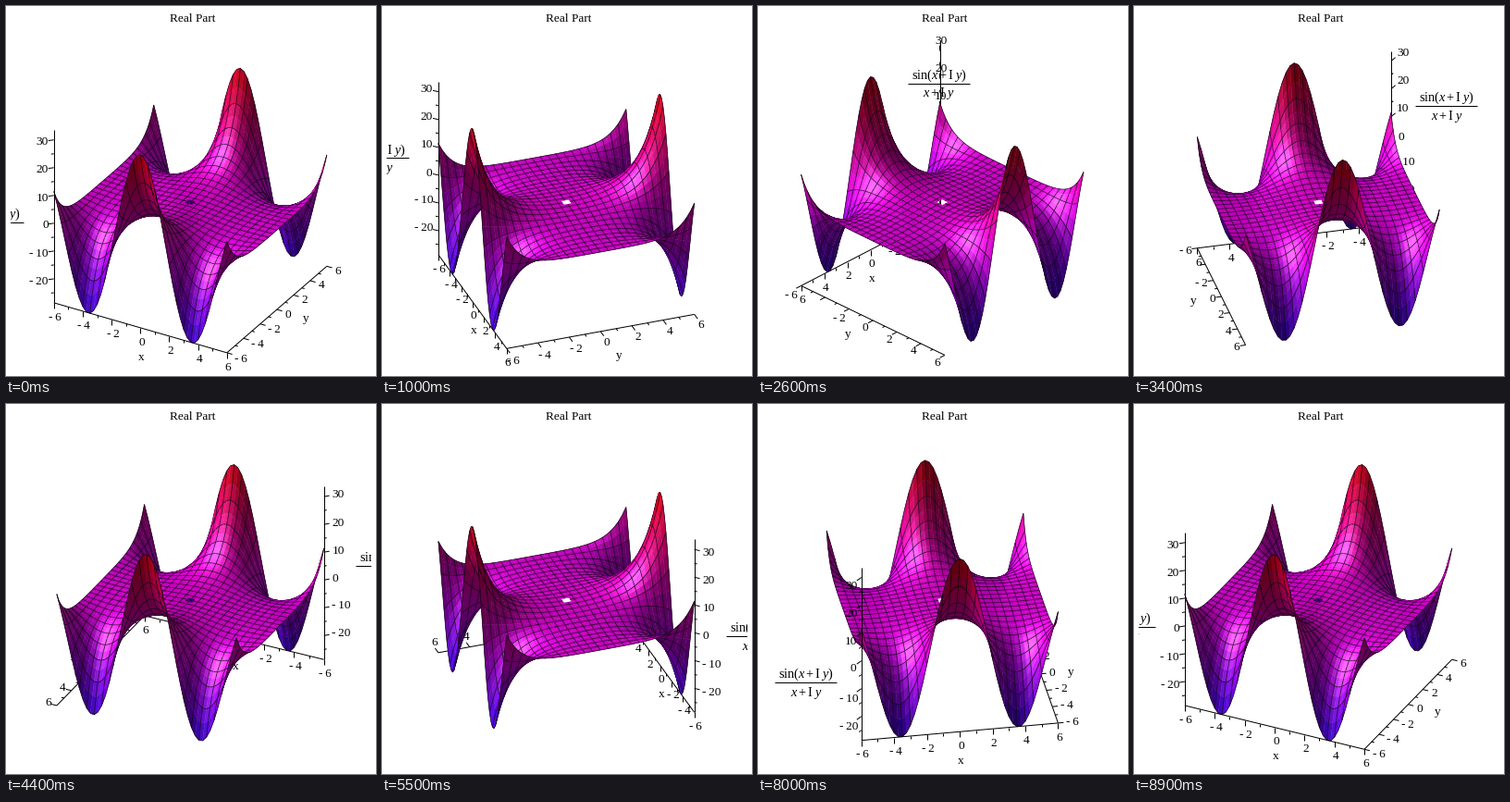
Recreate the animation shown at these times as a matplotlib script. Size 400x400 px, loop 9000 ms.

```python
import numpy as np
import matplotlib.pyplot as plt
from matplotlib.animation import FuncAnimation
from matplotlib.collections import PolyCollection
from matplotlib.colors import hsv_to_rgb

FRAMES, INTERVAL = 90, 100
PX = 0.72                      # one pixel in points at 100 dpi
CX, BASE, HEIGHT = 199.3, 301.1, 187
UNIT, TILT = 18, 0.5           # pixels per x/y unit, vertical foreshortening
FONT = 13.33

plt.rcParams.update({
    "font.family": ["Liberation Serif", "DejaVu Serif"],
    "mathtext.fontset": "custom",
    "mathtext.rm": "Liberation Serif",
    "mathtext.it": "Liberation Serif:italic",
})

# Surface Re(sin(z)/z); undefined at the origin, which leaves a small hole
N = 49
g = np.linspace(-6, 6, N)
X, Y = np.meshgrid(g, g, indexing="ij")
with np.errstate(all="ignore"):
    W = X + 1j * Y
    Z = (np.sin(W) / W).real
ZMIN, ZMAX = np.nanmin(Z), np.nanmax(Z)
ZPX = HEIGHT / (ZMAX - ZMIN)


def corners(a):
    return np.stack([a[:-1, :-1], a[1:, :-1], a[1:, 1:], a[:-1, 1:]], -1)


cx, cy, cz = (corners(a).reshape(-1, 4) for a in (X, Y, Z))
keep = ~np.isnan(cz).any(1)
cx, cy, cz = cx[keep], cy[keep], cz[keep]

# Cell normals in equal-scale space
slope = ZPX / np.sqrt(1 - TILT ** 2) / UNIT / (g[1] - g[0]) / 2
p = (cz[:, 1] + cz[:, 2] - cz[:, 0] - cz[:, 3]) * slope
q = (cz[:, 2] + cz[:, 3] - cz[:, 0] - cz[:, 1]) * slope
normal = np.stack([-p, -q, np.ones_like(p)], 1)
normal /= np.linalg.norm(normal, axis=1)[:, None]

level = (cz.mean(1) - ZMIN) / (ZMAX - ZMIN)
hue = 0.71 + 0.28 * level
base_rgb = hsv_to_rgb(np.stack([hue, np.ones_like(hue), np.ones_like(hue)], 1))

VIEW = np.array([0, np.sqrt(1 - TILT ** 2), TILT])
LIGHT = np.array([-0.76, 0.08, 0.645])
HALF = (VIEW + LIGHT) / np.linalg.norm(VIEW + LIGHT)


def grid_segments():
    """Mesh lines on every second grid row, as flat quads a-b-b-a."""
    out = []
    for a in (X, Y, Z):
        along_x = np.stack([a[:-1, ::2], a[1:, ::2]], -1).reshape(-1, 2)
        along_y = np.stack([a[::2, :-1], a[::2, 1:]], -1).reshape(-1, 2)
        out.append(np.concatenate([along_x, along_y]))
    is_x = np.arange(len(out[0])) < len(along_x)
    ok = ~np.isnan(out[2]).any(1)
    return [a[ok][:, [0, 1, 1, 0]] for a in out] + [is_x[ok]]


lx, ly, lz, l_is_x = grid_segments()
allx, ally, allz = (np.concatenate(v) for v in ((cx, lx), (cy, ly), (cz, lz)))
widths = np.r_[np.full(len(cx), 0.4), np.full(len(lx), 0.75)] * PX
line_rgba = np.tile([0.03, 0, 0.05, 0.85], (len(lx), 1))

fig = plt.figure(figsize=(4, 4), dpi=100, facecolor="white")
ax = fig.add_axes([5 / 400, 5 / 400, 390 / 400, 390 / 400])
ax.set_xlim(5, 395)
ax.set_ylim(395, 5)
ax.axis("off")
ax.text(201.3, 14, "Real Part", size=FONT * PX, ha="center", va="center")
live = []


def project(t, x, y, z=ZMIN):
    c, s = np.cos(t), np.sin(t)
    sx = CX + UNIT * (x * c + y * s)
    sy = BASE + UNIT * TILT * (x * s - y * c) - ZPX * (z - ZMIN)
    return np.array([sx, sy])


def unit(x, y):
    return np.array([x, y]) / np.hypot(x, y)


def line(a, b, order):
    live.extend(ax.plot([a[0], b[0]], [a[1], b[1]], color="black", lw=PX,
                        zorder=order, solid_capstyle="butt"))


def text(pos, s, order, size=FONT):
    live.append(ax.text(pos[0] + 1.4, pos[1] + 0.8, s, size=size * PX,
                        ha="center", va="center", zorder=order, clip_on=True))


def label_pos(pos, d, value):
    w = 6.7 * len(str(abs(value))) + (7 if value < 0 else 0)
    return pos + d * (7 + w / 2 * abs(d[0]) + 4.5 * abs(d[1]))


def ticks(point, values, step, d, order):
    for v in values:
        a = point(v)
        line(a, a + d * (6 if v % step == 0 else 3), order)


def number(pos, v, order):
    text(pos, f"-\u2009{-v}" if v < 0 else str(v), order)


def layer(front):
    return 5 if front else 1


def draw_surface(t):
    c, s = np.cos(t), np.sin(t)
    n = np.stack([normal[:, 0] * c + normal[:, 1] * s,
                  normal[:, 0] * s - normal[:, 1] * c, normal[:, 2]], 1)
    n *= np.where(n @ VIEW < 0, -1, 1)[:, None]
    diffuse = 0.38 + 0.60 * np.clip(n @ LIGHT, 0, 1)
    shine = 0.43 * np.clip(n @ HALF, 0, 1) ** 14
    rgb = np.clip(base_rgb * diffuse[:, None] + shine[:, None], 0, 1)
    rgba = np.concatenate([np.c_[rgb, np.ones(len(rgb))], line_rgba])

    # Back to front; mesh lines come just after both neighbouring cells
    depth = (allx * s - ally * c).mean(1)
    half = (g[1] - g[0]) / 2
    depth[len(cx):] += half * np.where(l_is_x, abs(c), abs(s)) + 1e-4
    order = np.argsort(depth, kind="stable")
    verts = np.moveaxis(project(t, allx, ally, allz), 0, -1)
    mesh = PolyCollection(verts[order], facecolors=rgba[order],
                          edgecolors=rgba[order], linewidths=widths[order],
                          zorder=3)
    live.append(mesh)
    ax.add_collection(mesh, autolim=False)


def draw_x_axis(t):
    order = layer(np.cos(t) > 0)
    point = lambda v: project(t, v, -6)
    down = np.array([0, 1])
    line(point(-6), point(6), order)
    ticks(point, range(-6, 7), 2, down, order)
    for v in range(-6, 7, 2):
        number(point(v) + 15 * down, v, order)
    text(point(0) + 31 * down, "x", order)


def draw_y_axis(t):
    c, s = np.cos(t), np.sin(t)
    order = layer(s > 0)
    point = lambda v: project(t, 6, v)
    out = unit(c, TILT * s)
    line(point(-6), point(6), order)
    ticks(point, range(-6, 7), 2, out, order)
    taken = project(t, 6, -6) + [0, 15]
    for v in range(-6, 7, 2):
        pos = label_pos(point(v), unit(c, 0.75 * s), v)
        if v == -6 or np.hypot(*(pos - taken)) > 20:
            number(pos, v, order)
    text(point(0) + 31.5 * out, "y", order)


def draw_z_axis(t):
    point = lambda v: project(t, -6, -6, v)
    dx, dy = point(ZMIN) - [CX, BASE]
    order = layer(dy > 0)
    out = unit(dx, dy)
    line(point(ZMIN), point(ZMAX), order)
    ticks(point, range(-25, 31, 5), 10, out, order)
    if dy < 0 or abs(dx) > 45:
        for v in range(-20, 31, 10):
            number(label_pos(point(v), out, v), v, order)

    u = unit(dx, 0.7 * dy)
    reach = 33 + 33 * abs(u[0]) + 13 * abs(u[1])
    mid = point((ZMIN + ZMAX) / 2) + u * reach + [1, 0]
    text(mid + [-1, -9], r"$\mathrm{sin}(x+\mathrm{I}\;y)$", order, 14.3)
    text(mid + [-1, 10.5], r"$x+\mathrm{I}\;y$", order, 14.3)
    line(mid - [33.5, 0], mid + [33.5, 0], order)


def update(k):
    while live:
        live.pop().remove()
    t = np.radians(30 + 360 * k / FRAMES)
    draw_surface(t)
    draw_x_axis(t)
    draw_y_axis(t)
    draw_z_axis(t)
    return []


anim = FuncAnimation(fig, update, frames=FRAMES, interval=INTERVAL,
                     init_func=lambda: [], repeat=True, repeat_delay=0,
                     blit=False)
plt.show()
```
